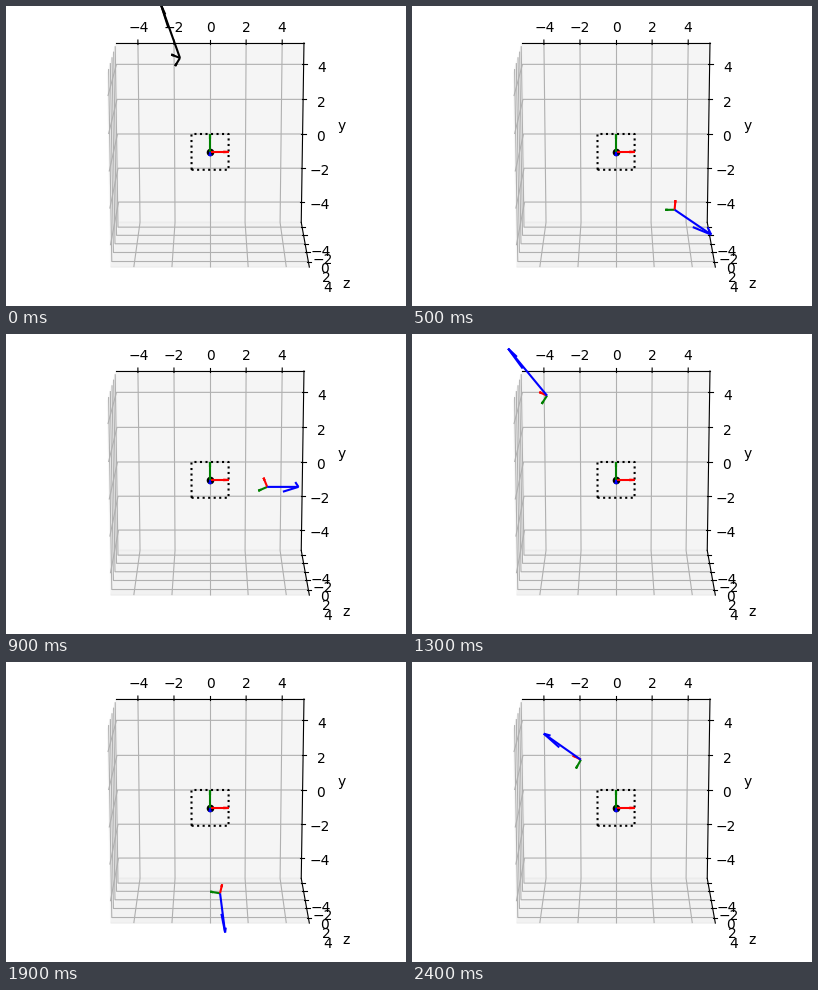
These frames come from a looping animation (400 by 300 pixels, 2500 ms). A matplotlib script:

```python
import numpy as np
import matplotlib.pyplot as plt
from matplotlib.animation import FuncAnimation

FRAMES, STEP = 25, 100
LIMIT = 5 + 10 / 48
DISTANCE = 10
DARK_UNTIL = 5

# key points of the path: step, position x and y, lean x and y
KEYS = np.array([
    (0, -1.49, 6.35, -.165, .627),
    (3, 2.47, 2.94, .222, .367),
    (7, 2.67, -2.86, .331, -.226),
    (9, 2.83, 1.54, .269, .193),
    (13, -3.43, 5.83, -.341, .576),
    (17, 1.95, 0, .19, .06),
    (19, .5, -2.43, .044, -.152),
    (24, -1.74, 4.18, -.335, .404),
])
TIMES, VALUES = KEYS[:, 0], KEYS[:, 1:]
SLOPES = np.gradient(VALUES, TIMES, axis=0)


def smooth(t):
    """Cubic Hermite interpolation between the key points."""
    i = min(np.searchsorted(TIMES, t, side="right") - 1, len(TIMES) - 2)
    span = TIMES[i + 1] - TIMES[i]
    s = (t - TIMES[i]) / span
    return ((1 + 2 * s) * (1 - s) ** 2 * VALUES[i]
            + s * (1 - s) ** 2 * span * SLOPES[i]
            + s * s * (3 - 2 * s) * VALUES[i + 1]
            + s * s * (s - 1) * span * SLOPES[i + 1])


def pose(t):
    """Origin and unit axes of the moving frame, which rolls twice per loop."""
    px, py, hx, hy = smooth(t)
    z = np.array([hx, hy, np.sqrt(1 - hx * hx - hy * hy)])
    roll = np.radians(120 + 42 * np.cos(4 * np.pi * t / FRAMES))
    x = np.array([np.cos(roll), np.sin(roll), 0])
    x[2] = -(x @ z) / z[2]
    x /= np.linalg.norm(x)
    return (px, py, DISTANCE * z[2]), (x, np.cross(z, x), z)


def draw_axes(origin, axes, lengths, colors):
    return [ax.quiver(*origin, *(n * v), color=c)
            for v, n, c in zip(axes, lengths, colors)]


fig = plt.figure(figsize=(4, 3), dpi=100)
ax = fig.add_axes([0, 0, 1, 1], projection="3d")
ax.view_init(elev=105, azim=-90)
lim = (-LIMIT, LIMIT)
ax.set(xlim=lim, ylim=lim, zlim=lim, xlabel="x", ylabel="y", zlabel="z")

ax.plot([-1, 1, 1, -1, -1], [-1, -1, 1, 1, -1], [0] * 5, "k:")
ax.scatter(0, 0, 0, color="k")
draw_axes((0, 0, 0), np.eye(3), (1, 1, 1), "rgb")

moving = []


def update(t):
    while moving:
        moving.pop().remove()
    origin, axes = pose(t)
    colors = "kkk" if t < DARK_UNTIL else "rgb"
    moving.extend(draw_axes(origin, axes, (.5, .5, 5), colors))
    return moving


anim = FuncAnimation(fig, update, frames=FRAMES, interval=STEP,
                     init_func=lambda: [], repeat=True, repeat_delay=0)
plt.show()
```
